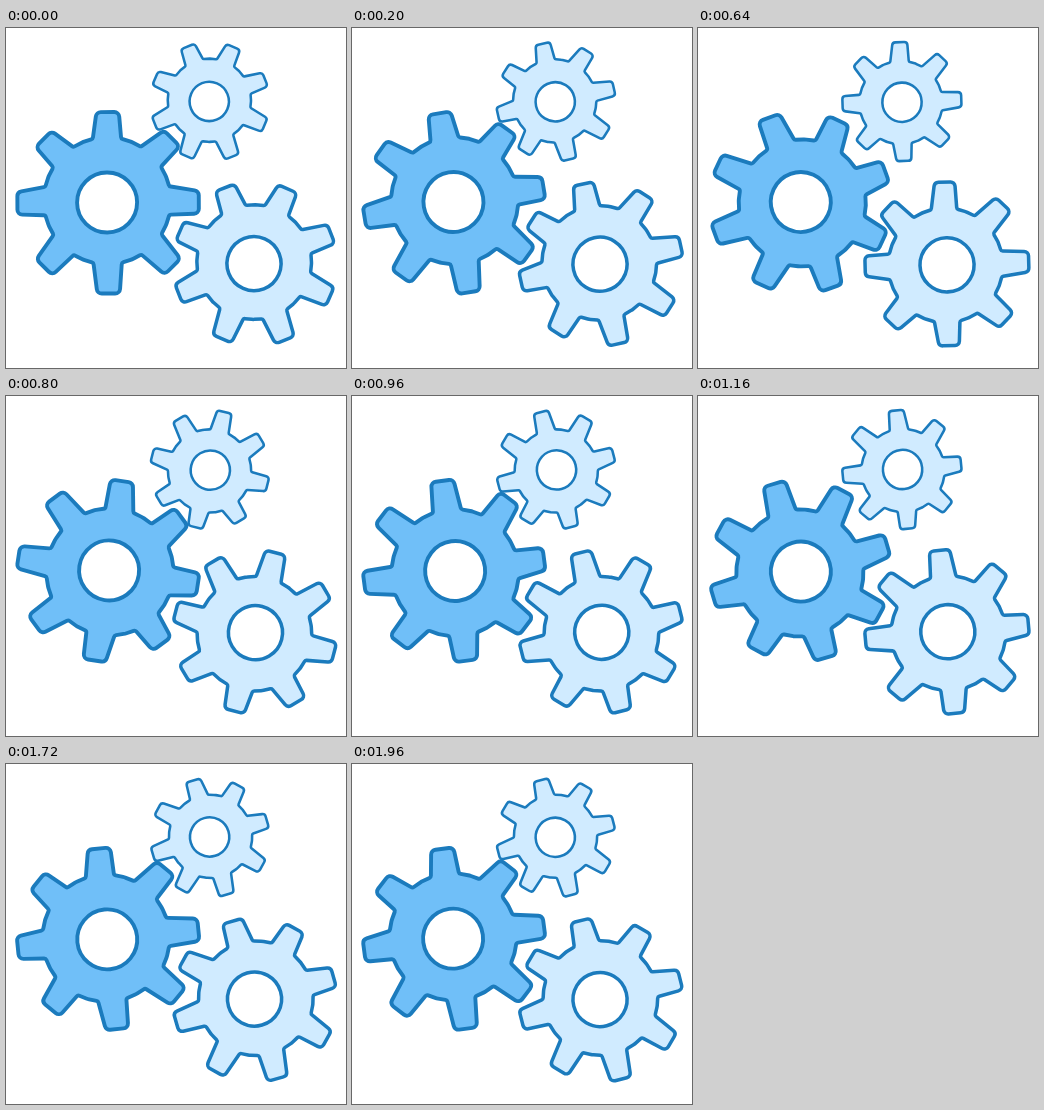
Write an HTML page with a canvas that moves like this. It is 340 by 340 pixels and loops after 2000 ms.

```html
<!DOCTYPE html>
<html lang="en">
<head>
<meta charset="utf-8">
<title>Turning gears</title>
<style>
  html, body { margin: 0; width: 100%; height: 100%; overflow: hidden; background: #fff; }
  canvas { display: block; width: 340px; height: 340px; }
</style>
</head>
<body>
<canvas id="stage"></canvas>
<script>
const SIZE = 340, LOOP = 2000, STEP = 40, TEETH = 8;
const LINE = '#1b7bbd';

// One gear shape, scaled for each wheel
const TIP = { r: 91.4, half: 11.2, round: 5 };
const ROOT = { r: 63.6, half: 14.2, round: 2.5 };
const HOLE = 30;

// Body and hole sit slightly off the axis (stage axes, at time zero)
const BODY_SHIFT = { x: -0.8, y: -2 };
const HOLE_SHIFT = { x: -1, y: -0.3 };

const gears = [
  { x: 102.1, y: 174.8, scale: 1, start: -0.3, dir: 1, fill: '#70bff8' },
  { x: 203.9, y: 73.6, scale: 0.655, start: 23.2, dir: -1, fill: '#d0ebff' },
  { x: 248.9, y: 235.9, scale: 0.902, start: 23.6, dir: -1, fill: '#d0ebff' }
];

const canvas = document.getElementById('stage');
const ctx = canvas.getContext('2d');
const ratio = window.devicePixelRatio || 1;
canvas.width = canvas.height = SIZE * ratio;

const rad = deg => deg * Math.PI / 180;

function rotate(p, angle) {
  const c = Math.cos(angle), s = Math.sin(angle);
  return { x: p.x * c - p.y * s, y: p.x * s + p.y * c };
}

function outline(shift) {
  const points = [];
  const add = (angle, x, r, round, move) => {
    const p = rotate({ x, y: -Math.sqrt(r * r - x * x) }, angle);
    points.push({ x: p.x + move.x, y: p.y + move.y, round });
  };
  const still = { x: 0, y: 0 };
  for (let i = 0; i < TEETH; i++) {
    const a = i * 2 * Math.PI / TEETH;
    add(a, -ROOT.half, ROOT.r, ROOT.round, shift);
    add(a, -TIP.half, TIP.r, TIP.round, still);
    add(a, TIP.half, TIP.r, TIP.round, still);
    add(a, ROOT.half, ROOT.r, ROOT.round, shift);
    add(a + Math.PI / TEETH, 0, ROOT.r, 18, shift);
  }
  const path = new Path2D();
  const last = points[points.length - 1];
  path.moveTo(last.x, last.y);
  for (let i = 0; i < points.length - 1; i++) {
    const p = points[i], next = points[i + 1];
    path.arcTo(p.x, p.y, next.x, next.y, p.round);
  }
  path.closePath();
  return path;
}

for (const g of gears) {
  const lean = -rad(g.start);
  g.rim = outline(rotate(BODY_SHIFT, lean));
  g.hole = rotate(HOLE_SHIFT, lean);
}

function drawGear(g, turn) {
  ctx.save();
  ctx.translate(g.x, g.y);
  ctx.rotate(rad(g.start + g.dir * turn));
  ctx.scale(g.scale, g.scale);
  ctx.lineWidth = 3.9;
  ctx.lineJoin = 'round';
  ctx.strokeStyle = LINE;
  ctx.fillStyle = g.fill;
  ctx.fill(g.rim);
  ctx.stroke(g.rim);
  ctx.beginPath();
  ctx.arc(g.hole.x, g.hole.y, HOLE, 0, 2 * Math.PI);
  ctx.fillStyle = '#fff';
  ctx.fill();
  ctx.stroke();
  ctx.restore();
}

const begin = performance.now();

function draw(now) {
  const t = Math.max(0, now - begin) % LOOP;
  const turn = Math.floor(t / STEP) * STEP / LOOP * 360;
  ctx.setTransform(ratio, 0, 0, ratio, 0, 0);
  ctx.fillStyle = '#fff';
  ctx.fillRect(0, 0, SIZE, SIZE);
  gears.forEach(g => drawGear(g, turn));
  requestAnimationFrame(draw);
}

draw(begin);
</script>
</body>
</html>
```
